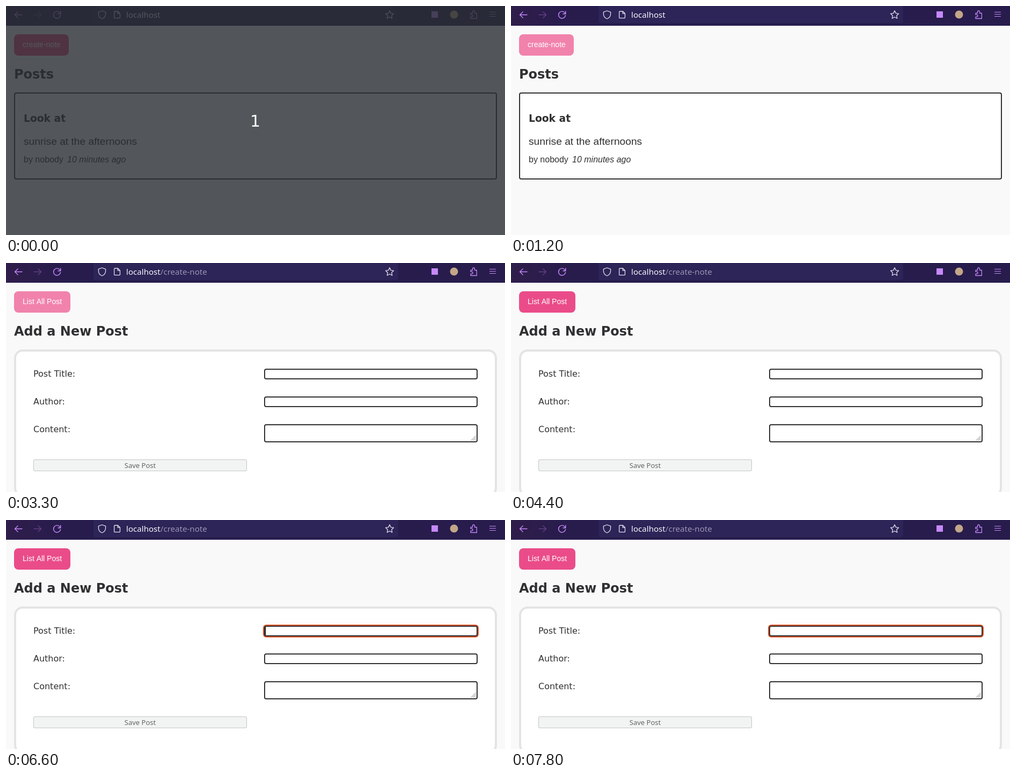
Recreate the animation shown at these times as an HTML page with a canvas. Size 930 by 429 pixels, loop 8 s.

```html
<!DOCTYPE html>
<html lang="en">
<head>
<meta charset="utf-8">
<title>Notes demo</title>
<style>
html, body { margin: 0; width: 100%; height: 100%; overflow: hidden; background: #f9f9f9; }
canvas { display: block; }
</style>
</head>
<body>
<canvas id="stage" width="930" height="429"></canvas>
<script>
const ctx = document.getElementById('stage').getContext('2d');

const LOOP = 8000;
const T = { start: 100, hover: 1200, form: 3300, leave: 4400, focus: 6600, caretOff: 7800 };

const UI = '"Noto Sans", "Open Sans", sans-serif';
const SANS = '"Liberation Sans", Arial, sans-serif';
const DEJAVU = '"DejaVu Sans", sans-serif';
const INK = '#303032';
const ACCENT = '#c689fb';
const PALE = '#e3e0f2';

function text(str, x, y, font, color = INK, align = 'left') {
  ctx.font = font;
  ctx.fillStyle = color;
  ctx.textAlign = align;
  ctx.fillText(str, x, y);
}

function rect(x, y, w, h, color) {
  ctx.fillStyle = color;
  ctx.fillRect(x, y, w, h);
}

function fillRound(x, y, w, h, r, color) {
  ctx.fillStyle = color;
  ctx.beginPath();
  ctx.roundRect(x, y, w, h, r);
  ctx.fill();
}

// Bordered box; the border lies inside the given bounds.
function box(x, y, w, h, r, border, color, fill = '#fff') {
  fillRound(x, y, w, h, r, color);
  fillRound(x + border, y + border, w - 2 * border, h - 2 * border, Math.max(0, r - border), fill);
}

function line(d, color, width = 1.3) {
  ctx.strokeStyle = color;
  ctx.lineWidth = width;
  ctx.lineCap = ctx.lineJoin = 'round';
  ctx.stroke(new Path2D(d));
}

function star(cx, cy, outer, inner) {
  let d = '';
  for (let i = 0; i < 10; i++) {
    const a = -Math.PI / 2 + i * Math.PI / 5;
    const r = i % 2 ? inner : outer;
    d += (i ? 'L' : 'M') + (cx + r * Math.cos(a)) + ' ' + (cy + r * Math.sin(a));
  }
  line(d + 'Z', PALE);
}

function toolbar(path) {
  const g = ctx.createLinearGradient(0, 0, 110, 0);
  g.addColorStop(0, '#2f1d4b');
  g.addColorStop(1, '#271c4c');
  rect(0, 0, 930, 37, g);
  rect(0, 36, 930, 1, '#2c2358');
  fillRound(163, -6, 568, 38, 4, '#2d2457');

  line('M30 16.5H16.7M22 11L16.5 16.5L22 22', ACCENT, 1.4);
  line('M52 16.5H65.3M60 11L65.5 16.5L60 22', '#634184', 1.4);
  line('M101.2 14.5A6.5 6.5 0 1 0 101.5 17.5M101.8 10V14.8H97', ACCENT, 1.4);

  line('M179 9L185.6 11.4V15C185.6 19.4 182.8 22.4 179 24C175.2 22.4 172.4 19.4 172.4 15V11.4Z', PALE);
  line('M203 10H208.5L212.5 14V21.5Q212.5 22.7 211.3 22.7H203Q201.7 22.7 201.7 21.5V11.3Q201.7 10 203 10ZM208.3 10.2V14.2H212.3', PALE);
  star(715, 16.8, 8, 3.9);

  fillRound(793, 10, 12, 12, 0, ACCENT);
  fillRound(827.5, 8.5, 15, 15, 7.5, '#c4a688');
  line('M866 13.5H869.5V11A2 2 0 0 1 873.5 11V13.5H877.3V23.5H866V20.3H868A2 2 0 0 0 868 16.3H866Z', ACCENT);
  for (const y of [11.5, 15.5, 19.5]) line(`M901.5 ${y}H912.5`, ACCENT, 1.2);

  const font = '15.1px ' + UI;
  text('localhost', 224, 22, font, '#f7f6fd');
  if (path) text(path, 224 + ctx.measureText('localhost').width, 22, font, '#9b94b5');
}

function linkButton(label, width, hover) {
  fillRound(15, 53, width, 40, 8, hover ? '#f182ac' : '#ea4c89');
  text(label, 31, 77, '14px ' + SANS, '#fff');
}

function heading(str) {
  text(str, 15, 136, 'bold 24px ' + DEJAVU);
}

function listPage(hover) {
  linkButton('create-note', 102, hover);
  heading('Posts');
  box(15, 162, 900, 163, 4, 2, INK);
  text('Look at', 33, 217, 'bold 18.72px ' + DEJAVU);
  text('sunrise at the afternoons', 33, 260, '19.2px ' + SANS);
  text('by nobody', 33, 293, '16px ' + SANS);
  text('10 minutes ago', 114, 293, 'italic 16px ' + SANS);
}

function formPage(hover, focus, caret) {
  linkButton('List All Post', 105, hover);
  heading('Add a New Post');
  box(15, 162, 900, 276, 16, 4, '#e4e4e4');

  ['Post Title:', 'Author:', 'Content:'].forEach((label, i) => {
    const y = 198 + 52 * i;
    text(label, 51, y + 15, '16px ' + DEJAVU);
    if (i === 0 && focus) fillRound(479, 196, 402, 24, 6, '#dd5427');
    box(481, y, 398, i < 2 ? 20 : 34, 4, 2, INK);
  });
  if (caret) rect(483, 200, 1, 16, '#000');

  line('M867 332.5L875.5 324M870.5 332.5L875.5 327.5M874 332.5L875.5 331', '#777', 1);

  box(51, 368, 398, 22, 3, 1, '#c3c6c5', '#f2f4f3');
  text('Save Post', 250, 384, '13px ' + UI, '#636365', 'center');
}

function countdown() {
  rect(0, 0, 930, 429, 'rgba(41,45,50,0.8)');
  text('1', 464.5, 226, '30px ' + DEJAVU, '#fff', 'center');
}

function draw(t) {
  const form = t >= T.form;
  const hover = t >= T.hover && t < T.leave;
  const focus = t >= T.focus;
  rect(0, 0, 930, 429, '#f9f9f9');
  toolbar(form ? '/create-note' : '');
  if (form) formPage(hover, focus, focus && t < T.caretOff);
  else listPage(hover);
  if (t < T.start) countdown();
}

const began = performance.now();
function tick() {
  draw((performance.now() - began) % LOOP);
  requestAnimationFrame(tick);
}
tick();
</script>
</body>
</html>
```
